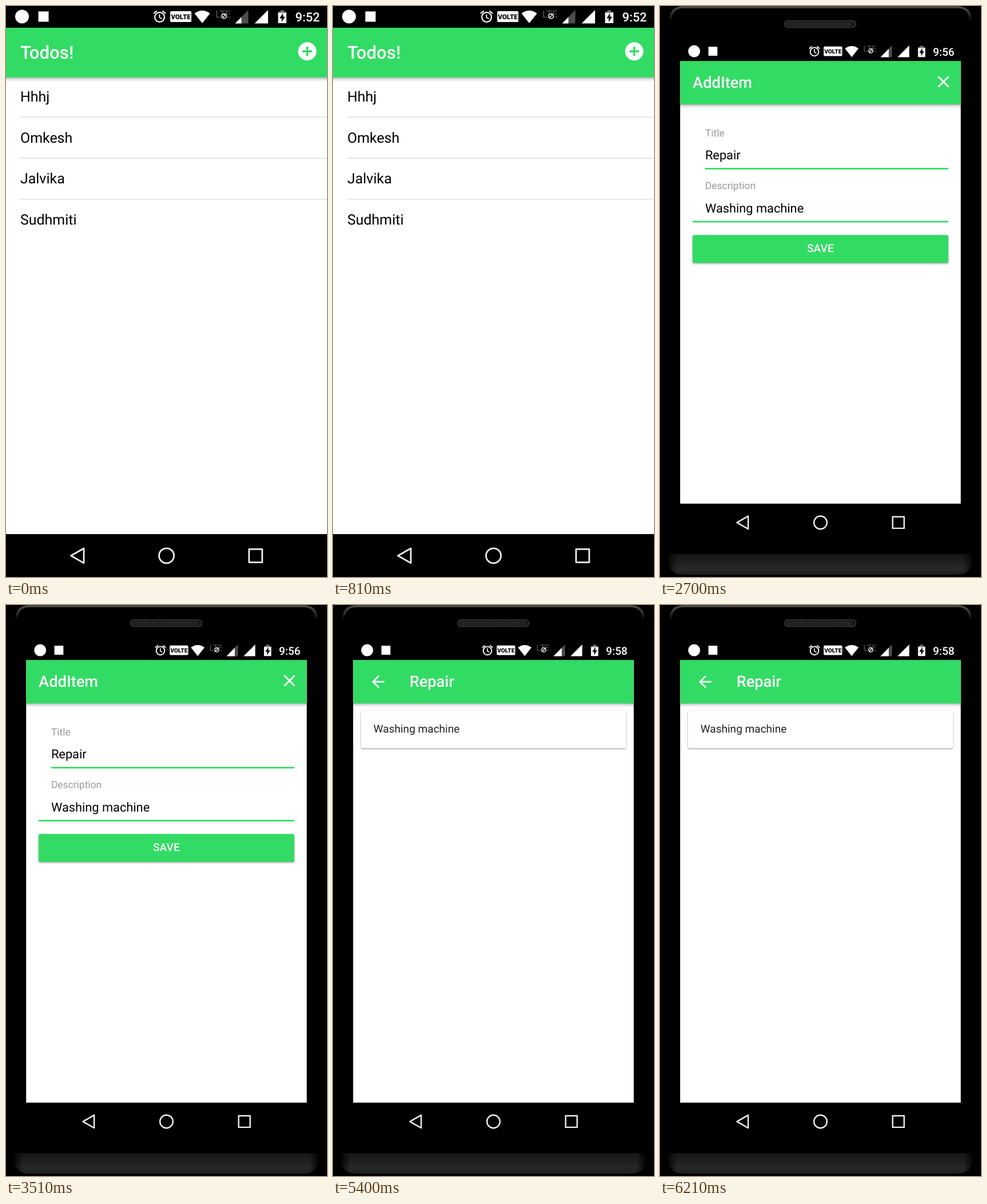
Write an HTML page that moves like this. It is 561 by 998 pixels and loops after 6.75 s.

```html
<!DOCTYPE html>
<html lang="en">
<head>
<meta charset="utf-8">
<title>Todo app tour</title>
<style>
html, body { margin: 0; width: 100%; height: 100%; overflow: hidden; background: #000; }
svg { display: block; width: 100vw; height: 100vh; }
text { font-family: Roboto, "Noto Sans", sans-serif; text-rendering: geometricPrecision; }
.raised {
  filter: drop-shadow(0 2.5px 1.6px rgba(0, 0, 0, .27)) drop-shadow(0 0 2px rgba(0, 0, 0, .13));
}
</style>
</head>
<body>
<svg id="stage" viewBox="0 0 561 998" xmlns="http://www.w3.org/2000/svg">
  <defs>
    <linearGradient id="barShadow" x2="0" y2="1">
      <stop stop-opacity=".32"/><stop offset=".4" stop-opacity=".12"/><stop offset="1" stop-opacity="0"/>
    </linearGradient>
    <linearGradient id="rim" gradientUnits="userSpaceOnUse" x1="0" y1="0" x2="0" y2="998">
      <stop stop-color="#9a9a9a"/><stop offset=".1" stop-color="#707070"/>
      <stop offset=".3" stop-color="#505050"/><stop offset=".88" stop-color="#4c4c4c"/>
      <stop offset="1" stop-color="#6a6a6a"/>
    </linearGradient>
    <linearGradient id="key" x2="0" y2="1">
      <stop stop-color="#bbb"/><stop offset=".1" stop-color="#666"/>
      <stop offset=".9" stop-color="#585858"/><stop offset="1" stop-color="#999"/>
    </linearGradient>
    <linearGradient id="lip" gradientUnits="userSpaceOnUse" x1="0" y1="0" x2="0" y2="26">
      <stop stop-color="#4c4c4c"/><stop offset=".5" stop-color="#333"/><stop offset="1" stop-color="#000"/>
    </linearGradient>
    <linearGradient id="chin" x2="0" y2="1">
      <stop stop-color="#161616"/><stop offset=".7" stop-color="#272727"/><stop offset="1" stop-color="#1f1f1f"/>
    </linearGradient>
    <linearGradient id="chinFade">
      <stop stop-opacity=".8"/><stop offset=".03" stop-opacity="0"/>
      <stop offset=".97" stop-opacity="0"/><stop offset="1" stop-opacity=".8"/>
    </linearGradient>
  </defs>
  <rect width="561" height="998"/>
  <g id="device"></g>
  <g id="screen"></g>
</svg>
<script>
const GREEN = '#32db64';
const SCENE_MS = 1350;
const PITCH = 71.68;

const text = (x, y, size, content, fill = '#000', extra = '') =>
  `<text x="${x}" y="${y}" font-size="${size}" fill="${fill}" ${extra}>${content}</text>`;
const rect = (x, y, w, h, fill, extra = '') =>
  `<rect x="${x}" y="${y}" width="${w}" height="${h}" fill="${fill}" ${extra}/>`;
const path = (d, fill, extra = '') => `<path d="${d}" fill="${fill}" ${extra}/>`;
const line = (d, color, width, extra = '') =>
  path(d, 'none', `stroke="${color}" stroke-width="${width}" ${extra}`);
const circle = (x, y, r, fill, extra = '') =>
  `<circle cx="${x}" cy="${y}" r="${r}" fill="${fill}" ${extra}/>`;

function speaker(x, y, w, edge, mesh) {
  const beads = dy => line(`M${x + 6} ${y + dy}H${x + w - 5}`, mesh, 3.4,
    'stroke-linecap="round" stroke-dasharray="0 4.6"');
  return rect(x, y, w, 11.5, '#161616', `rx="5.7" stroke="${edge}" stroke-width="1.5"`) +
    beads(4.2) + beads(7.6);
}

function roundPhone() {
  const body = `M35 320L36.5 105C37 50 60 24 110 16Q280 -5 450 16C501 24 524 50 524.5 105
    L526 320V480L523 880C520 950 491 976 435 983Q280 1003 126 983C70 976 41 950 38 880L35 480Z`;
  return rect(26, 317, 7, 155, 'url(#key)', 'rx="2.5"') +
    rect(528, 219, 7, 71, 'url(#key)', 'rx="2.5"') +
    line(body, '#2b2b2b', 9) + line(body, 'url(#rim)', 4) +
    speaker(223.5, 46, 111, '#5c5c5c', '#444') +
    rect(348, 47, 20, 10, '#1b1b1b', 'rx="5"') +
    circle(384, 51, 6.5, '#1d1d1d') +
    circle(439, 56, 11, '#34383d') + circle(439, 56, 6.5, '#4b515c') +
    rect(65.5, 125.5, 430, 764, '#000', 'stroke="#151515"');
}

function squarePhone() {
  const chin = 'M14 958H546V966Q546 994 520 994H40Q14 994 14 966Z';
  return line('M18.5 26Q18 2 42 2H519Q543 2 542.5 26', 'url(#lip)', 4) +
    speaker(217.5, 26, 125, '#3d3d3d', '#303030') +
    path(chin, 'url(#chin)') + path(chin, 'url(#chinFade)');
}

function statusBar({ time, signal, wifi = 1 }) {
  const fan = 'M343 30L329.5 13Q343 3 356.5 13Z';
  return rect(0, 0, 561, 38, '#000') +
    circle(28, 18.5, 12, '#fff') +
    rect(56.5, 9.5, 18, 18, '#fff') +
    circle(268.5, 19.5, 8.4, 'none', 'stroke="#fff" stroke-width="2.2"') +
    line('M258 13.2L263.6 8.6M279 13.2L273.4 8.6', '#fff', 2.2) +
    line('M268.3 14.5V20L272.5 22.6', '#fff', 1.8) +
    rect(287, 9, 37, 19, '#fff', 'rx="2"') +
    text(305.5, 22.8, 11.6, 'VOLTE', '#000', 'font-weight="900" text-anchor="middle"') +
    path(fan, '#4d4d4d') +
    path(fan, '#fff', `transform="translate(343 30) scale(${wifi}) translate(-343 -30)"`) +
    text(366, 19.6, 17, 'LTE', '#555') +
    circle(381, 17.8, 5.6, '#000') +
    circle(381, 17.8, 4.2, 'none', 'stroke="#fff" stroke-width="1.6"') +
    line('M378 20.8L384 14.8', '#fff', 1.6) +
    path('M400.5 30.5L423.5 7V30.5Z', '#4d4d4d') +
    path(`M400.5 30.5L${signal} ${30.5 - (signal - 400.5) * 1.02}V30.5Z`, '#fff') +
    path('M434.5 30.5L458 7V30.5Z', '#fff') +
    path('M475.5 14V10H479.5V7.5H486V10H490V14Z', '#777') +
    rect(475.5, 12, 14.5, 18, '#fff', 'rx="1"') +
    path('M484.3 12.5L478 21.5H481.8V28L487.8 18.8H484.3Z', '#000') +
    text(505.5, 27.3, 21.8, time, '#fff', 'font-weight="500"');
}

function navBar() {
  const pen = 'stroke="#eee" stroke-width="2.8" stroke-linejoin="round"';
  return rect(0, 923, 561, 75, '#000') +
    path('M113.5 960.8L136 948V973.6Z', 'none', pen) +
    circle(280.5, 960.8, 13, 'none', pen) +
    rect(424.8, 949.3, 23, 23, 'none', pen);
}

const icons = {
  add: circle(526.5, 79.2, 16, '#fff') + line('M518.2 79.2H534.8M526.5 70.9V87.5', GREEN, 3.4),
  close: line('M516 69.1L536.9 90M536.9 69.1L516 90', '#fff', 3.3),
  back: line('M62.5 81.5H40M51.3 69.9L39.7 81.5L51.3 93.1', '#fff', 3.1),
};

const header = (title, icon, x = 25) =>
  rect(0, 124.7, 561, 8, 'url(#barShadow)') + rect(0, 38, 561, 86.8, GREEN) +
  text(x, 92, 31.17, title, '#fff', 'font-weight="500"') + icons[icon];

const list = items => items.map((item, i) =>
  text(25, 167 + i * PITCH, 24.93, item) +
  (i ? rect(25, 193.6 + (i - 1) * PITCH, 536, 1.56, '#dedede') : '')).join('');

function field(label, value, x, y) {
  const rule = (h, color) => rect(x, y + 19.8 - h, 511 - (x - 25), h, color);
  return value
    ? text(50, y - 46.6, 19.94, label, '#999') + text(50, y, 24.93, value) + rule(3.1, GREEN)
    : text(50, y, 24.93, label, '#999') + rule(1.56, '#dedede');
}

const form = (title, description) =>
  field('Title', title, 50, 235) + field('Description', description, 25, 341) +
  rect(25, 385.8, 511, 56, GREEN, 'rx="3" class="raised"') +
  text(280.5, 420.2, 21.8, 'SAVE', '#fff', 'font-weight="500" text-anchor="middle"');

const card = content =>
  rect(15.6, 140, 529.8, 74, '#fff', 'rx="3" class="raised"') +
  text(40.6, 183.2, 21.8, content, '#222');

const frames = {
  full: { art: '', place: '' },
  round: { art: roundPhone(), place: 'translate(66 126) scale(.7647)' },
  square: { art: squarePhone(), place: 'translate(35.2 62.9) scale(.8742)' },
};

const todos = ['Hhhj', 'Omkesh', 'Jalvika', 'Sudhmiti'];
const scenes = [
  { frame: 'full', time: '9:52', signal: 411.5, page: list(todos) + header('Todos!', 'add') },
  { frame: 'round', time: '9:54', signal: 413.5, wifi: 0.8, page: form() + header('AddItem', 'close') },
  { frame: 'square', time: '9:56', signal: 417,
    page: form('Repair', 'Washing machine') + header('AddItem', 'close') },
  { frame: 'square', time: '9:57', signal: 417,
    page: list([...todos, 'Shopping', 'Repair']) + header('Todos!', 'add') },
  { frame: 'square', time: '9:58', signal: 417,
    page: card('Washing machine') + header('Repair', 'back', 112.6) },
];

const device = document.getElementById('device');
const screenGroup = document.getElementById('screen');
let shown = -1;

function render(ms) {
  const index = Math.floor(ms / SCENE_MS) % scenes.length;
  if (index === shown) return;
  shown = index;
  const scene = scenes[index];
  const { art, place } = frames[scene.frame];
  device.innerHTML = art;
  screenGroup.setAttribute('transform', place);
  screenGroup.innerHTML = rect(0, 38, 561, 885.5, '#fff') + scene.page + statusBar(scene) + navBar();
}

const start = performance.now();
function tick() {
  render(performance.now() - start);
  requestAnimationFrame(tick);
}
tick();
</script>
</body>
</html>
```
